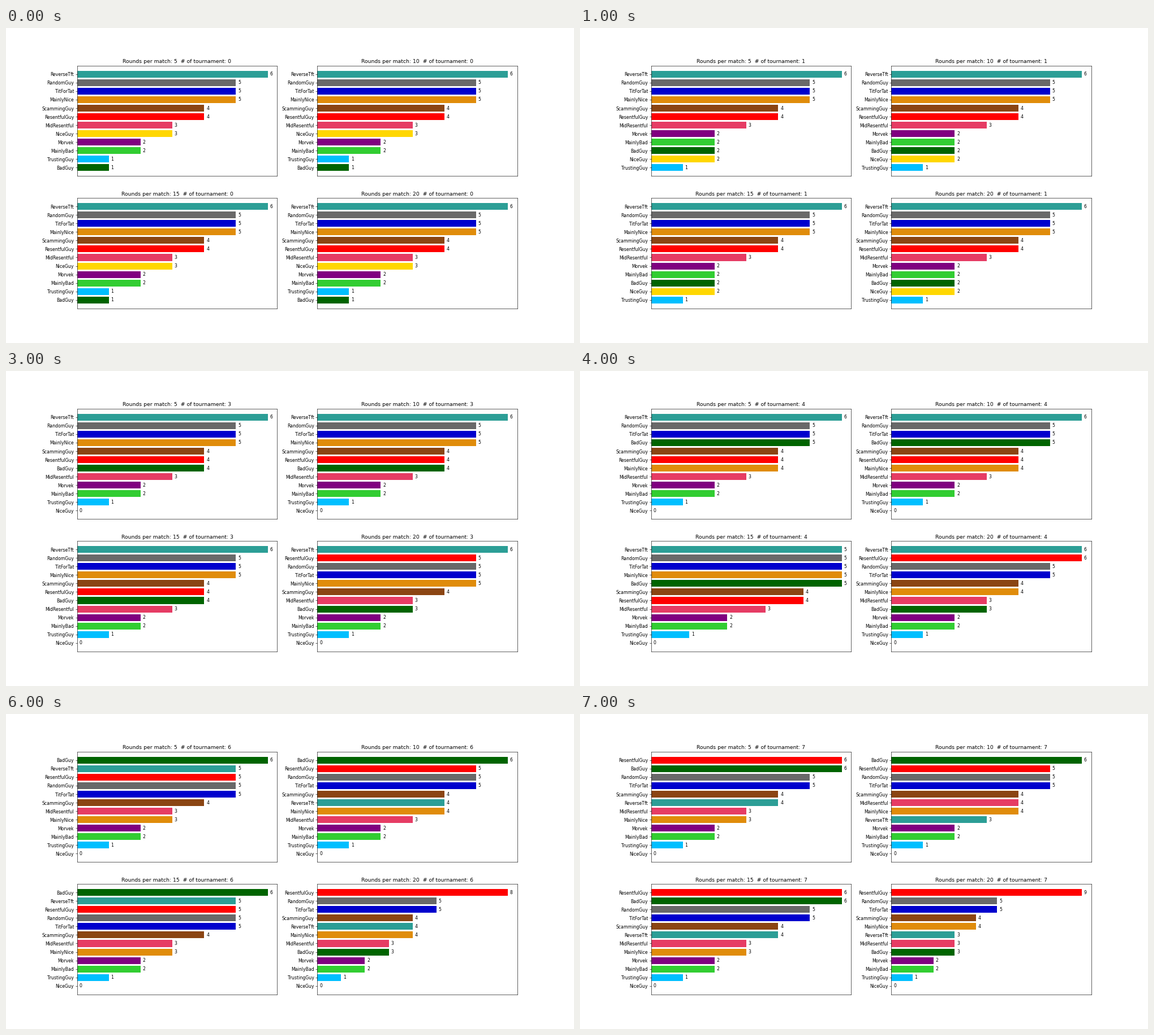
A matplotlib script that plays this animation: 1004 by 558 pixels, repeating every 8000 ms.

```python
import matplotlib.pyplot as plt
from matplotlib.animation import FuncAnimation

plt.rcParams["font.family"] = "DejaVu Sans"

# Name: (starting population, colour); the order also settles ties.
PLAYERS = {
    "NiceGuy": (3, "gold"),
    "BadGuy": (1, "darkgreen"),
    "TrustingGuy": (1, "deepskyblue"),
    "MainlyNice": (5, "#e08c0b"),
    "MainlyBad": (2, "limegreen"),
    "MidResentful": (3, "#e63c64"),
    "TitForTat": (5, "mediumblue"),
    "RandomGuy": (5, "dimgray"),
    "ResentfulGuy": (4, "red"),
    "ReverseTft": (6, "#2c9e96"),
    "ScammingGuy": (4, "saddlebrown"),
    "Morvek": (2, "purple"),
}

NICE, BAD, MAINLY = "NiceGuy", "BadGuy", "MainlyNice"
RESENT, REVERSE, MID = "ResentfulGuy", "ReverseTft", "MidResentful"

# Each tournament moves one member from the loser to the winner.
OPENING = [(BAD, NICE)] * 2
RESULTS = {
    5: OPENING + [(BAD, NICE)] + [(BAD, MAINLY)] * 2 + [(RESENT, REVERSE)] * 2,
    10: OPENING + [(BAD, NICE), (BAD, MAINLY), (RESENT, REVERSE),
                   (BAD, REVERSE), (MID, REVERSE)],
    15: OPENING + [(BAD, NICE), (BAD, REVERSE), (BAD, MAINLY),
                   (RESENT, MAINLY), (RESENT, REVERSE)],
    20: OPENING + [(RESENT, NICE), (RESENT, MAINLY)] + [(RESENT, REVERSE)] * 3,
}


def population(rounds, tournament):
    counts = {name: start for name, (start, _) in PLAYERS.items()}
    for winner, loser in RESULTS[rounds][:tournament]:
        counts[winner] += 1
        counts[loser] -= 1
    return counts


def draw_panel(ax, rounds, tournament):
    counts = population(rounds, tournament)
    names = sorted(counts, key=counts.get)
    ax.clear()
    bars = ax.barh(names, [counts[n] for n in names],
                   color=[PLAYERS[n][1] for n in names])
    ax.bar_label(bars, padding=5)
    ax.set_xlim(0, 1.05 * max(counts.values()))
    ax.set_xticks([])
    ax.set_title(f"Rounds per match: {rounds}  # of tournament: {tournament}")


fig, axes = plt.subplots(2, 2, figsize=(18, 10), dpi=55.8)


def update(tournament):
    for ax, rounds in zip(axes.flat, RESULTS):
        draw_panel(ax, rounds, tournament)
    return []


anim = FuncAnimation(fig, update, frames=8, interval=1000,
                     init_func=lambda: update(0), repeat=True, repeat_delay=0)
plt.show()
```
